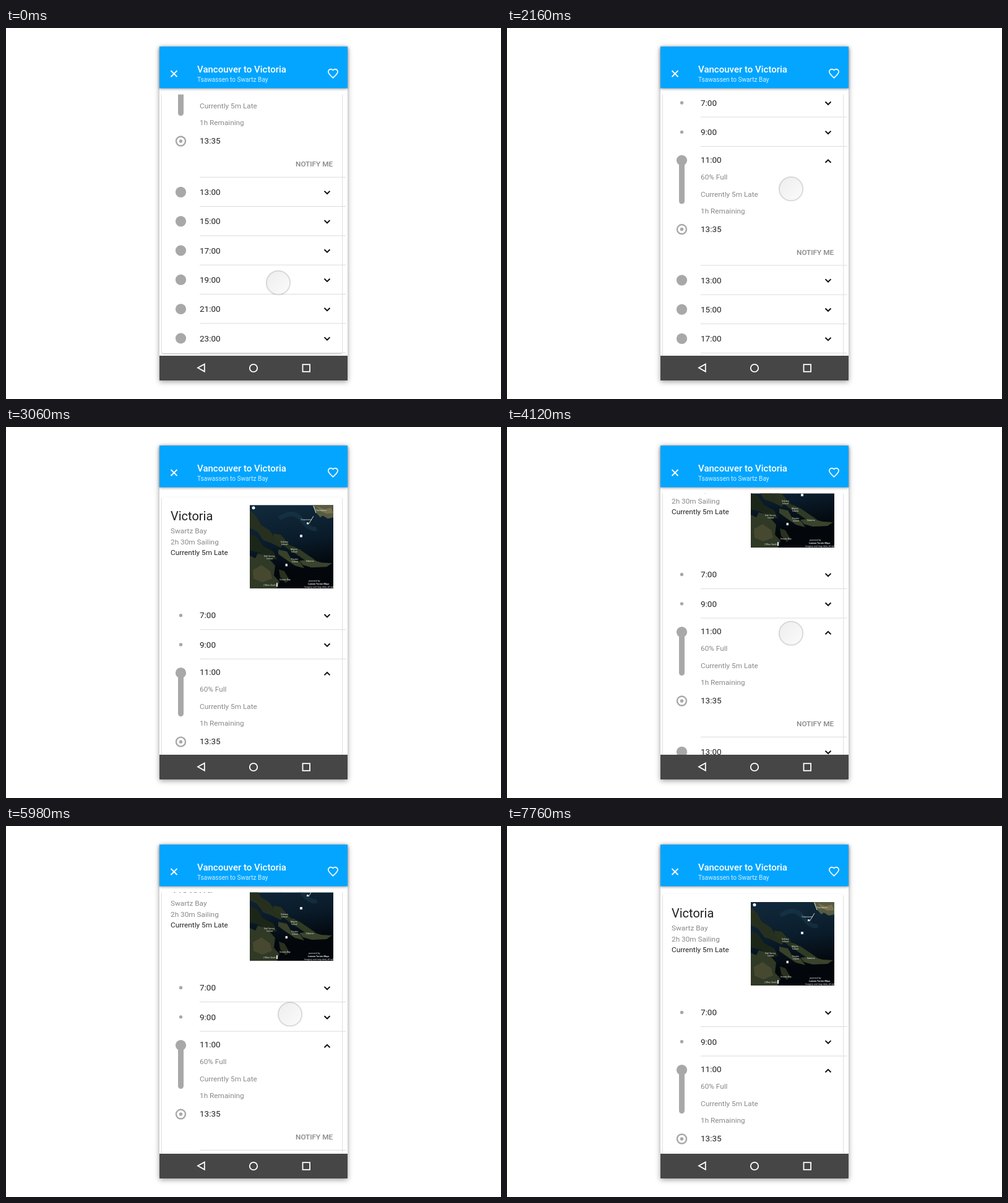
Recreate the animation shown at these times as an HTML page. Size 800x600 px, loop 7.78 s.

```html
<!DOCTYPE html>
<html lang="en">
<head>
<meta charset="utf-8">
<title>Ferry schedule</title>
<style>
  html, body { margin: 0; width: 100%; height: 100%; overflow: hidden; background: #fff; }
  svg { display: block; font: 11.8px Roboto, sans-serif; }
  .phone { fill: #fff; filter: drop-shadow(0 2px 4px rgba(0, 0, 0, .4)); }
  .header { fill: #03a5ff; filter: drop-shadow(0 1px 2px rgba(0, 0, 0, .4)); }
  .icon { fill: none; stroke: #fff; stroke-width: 1.8; }
  .card { fill: #fff; filter: drop-shadow(0 1px .8px rgba(0, 0, 0, .32)); }
  .time { font-size: 13.5px; fill: #222; }
  .note { fill: #888; }
  .rule { stroke: #dcdcdc; }
  .chevron { fill: none; stroke: #111; stroke-width: 2; }
  .mark { fill: #a8a8a8; }
  .ring { fill: none; stroke: #a8a8a8; stroke-width: 2.4; }
  .tiny { font-size: 3.6px; fill: #e4e8e4; }
</style>
</head>
<body>
<svg width="800" height="600" viewBox="0 0 800 600">
  <defs>
    <clipPath id="view"><rect x="248" y="107.5" width="304" height="422.5"/></clipPath>
    <clipPath id="mapEdge"><rect width="135" height="135"/></clipPath>
    <linearGradient id="sea" x1=".55" y1="0" x2=".7" y2="1">
      <stop offset="0" stop-color="#10283a"/>
      <stop offset=".4" stop-color="#0a1c2b"/>
      <stop offset=".75" stop-color="#03070c"/>
    </linearGradient>
    <linearGradient id="touch" x1="0" y1="0" x2="1" y2="1">
      <stop offset="0" stop-color="#e9e9e9"/>
      <stop offset="1" stop-color="#fafafa"/>
    </linearGradient>
  </defs>

  <rect class="phone" x="248" y="30" width="304" height="540"/>
  <g clip-path="url(#view)">
    <g id="list">
      <rect class="card" x="252" y="110" width="291" height="739" rx="2"/>
      <text x="266" y="148" font-size="20" fill="#222">Victoria</text>
      <text class="note" x="266" y="168.5">Swartz Bay</text>
      <text class="note" x="266" y="186.5">2h 30m Sailing</text>
      <text x="266" y="204" fill="#222">Currently 5m Late</text>
      <g id="map" transform="translate(394 123)" clip-path="url(#mapEdge)"></g>
      <g id="rows"></g>
    </g>
  </g>

  <rect class="header" x="248" y="30" width="304" height="67.5"/>
  <path class="icon" d="M266.5 69l10 10m0-10l-10 10"/>
  <text x="309" y="72" font-size="15" font-weight="500" fill="#fff">Vancouver to Victoria</text>
  <text x="309" y="87" font-size="10.1" fill="#d3efff">Tsawassen to Swartz Bay</text>
  <path class="icon" transform="translate(519.3 64.3) scale(.765)" style="stroke-width:2.1"
    d="M16.5 3c-1.74 0-3.41.81-4.5 2.09C10.91 3.81 9.24 3 7.5 3 4.42 3 2 5.42 2 8.5c0 3.78 3.4 6.86 8.55 11.54L12 21.35l1.45-1.32C18.6 15.36 22 12.28 22 8.5 22 5.42 19.58 3 16.5 3z"/>
  <rect x="248" y="530" width="304" height="40" fill="#464646"/>
  <path class="icon" d="M310 549.5L320.8 543.6V555.6z"/>
  <circle class="icon" cx="400" cy="550" r="6.2"/>
  <rect class="icon" x="479.5" y="544.2" width="11.6" height="11.6"/>
  <circle id="finger" r="19.2" fill="url(#touch)" fill-opacity=".8" stroke="#000" stroke-opacity=".13" stroke-width="2"/>
</svg>

<script>
const LOOP = 7780, PITCH = 47.3;
const $ = id => document.getElementById(id);

const text = (cls, y, s, x = 313) => `<text class="${cls}" x="${x}" y="${y}">${s}</text>`;
const dot = (y, r) => `<circle class="mark" cx="282.5" cy="${y}" r="${r}"/>`;
const rule = y => `<path class="rule" d="M313 ${y}H549.5"/>`;
const chevron = (y, h = 4.4) => `<path class="chevron" d="M514.5 ${y - h / 2}l4.5 ${h} 4.5 ${-h}"/>`;
const row = (y, time, r) => dot(y, r) + text('time', y + 4.8, time) + chevron(y + .5);

function buildRows() {
  let out = row(301.5, '7:00', 2.7) + rule(324.5) + row(348.8, '9:00', 2.7) + rule(372);
  out += dot(394.5, 8.6) + '<rect class="mark" x="278" y="390" width="9" height="75" rx="4.5"/>';
  out += text('time', 398.3, '11:00') + chevron(396, -4.4);
  out += text('note', 425, '60% Full') + text('note', 453, 'Currently 5m Late') + text('note', 480, '1h Remaining');
  out += '<circle class="ring" cx="282.5" cy="506" r="7.5"/>' + dot(506, 2.7) + text('time', 510.3, '13:35');
  out += '<text class="note" x="468" y="547.2" font-weight="500">NOTIFY ME</text>' + rule(564.3);
  for (let i = 0; i < 6; i++)
    out += row(588.3 + i * PITCH, `${13 + 2 * i}:00`, 8.6) + rule(564.3 + (i + 1) * PITCH);
  return out;
}

function buildMap() {
  const land = (fill, d) => `<path fill="${fill}" d="${d}"/>`;
  const label = (x, y, s) => text('tiny', y, s, x);
  return '<rect width="135" height="135" fill="url(#sea)"/>' +
    '<path d="M48 22q22-16 36 2t24 14" fill="none" stroke="#1b3c4d" stroke-width="7" opacity=".5"/>' +
    land('#27301f', 'M0 8l10 10 8 14 14 9 10 14 12 8-4 6-16-8-12-4-10-14-12-6z') +
    land('#1c2618', 'M0 46l12 6 9 14 17 9 6 12-10 2-18-12-16-4z') +
    land('#2f3925', 'M0 82l9 4 4-8 14 4 14 16-2 16 9 10-4 11H0z') +
    land('#46492f', 'M5 105l14-8 14 10 3 12-16 6-14-6z') +
    land('#28331f', 'M38 46l12 2 15 17 11 6 3 9-12-5-15-12-12-8z') +
    land('#384129', 'M46 72l14 3 7 12 14 5 7 10-15-4-16-11-11-8z') +
    land('#2f3b25', 'M68 66l13 6 22 15 9 7-5 3-18-8-19-13z') +
    land('#3a432c', 'M80 90l18-2 18 5 17 1-9 6-24 1-14-4z') +
    land('#28321f', 'M47 104l9 3 8 14-6 5-9-10z') +
    land('#565b41', 'M101 0h34v20l-9 2-8-5-4 3-8-9z') +
    land('#777052', 'M108 2l13 5 10-3 4 9-11 1-9-4z') +
    '<path d="M103 1l4 12M95 31l8-13" stroke="#d8d8ce" stroke-width="1"/>' +
    '<circle cx="6" cy="4.5" r="2.5" fill="#fff"/>' +
    '<path d="M81 48h4v4h-4zM57.5 95h3.5v4h-3.5zM92 28h3v3h-3zM43 126h2v6h-2z" fill="#dfe3e6"/>' +
    label(82, 25, 'Tsawassen') + label(107, 10, 'Vancouver') + label(50, 61, 'Galiano') + label(51, 65, 'Island') +
    label(66, 73, 'Mayne') + label(67, 77, 'Island') + label(23, 84, 'Salt Spring') + label(27, 88, 'Island') +
    label(67, 89, 'Pender') + label(68, 93, 'Island') + label(91, 92, 'Saturna') + label(48, 122, 'Swartz Bay') +
    label(22, 131, '(10km South)') + label(95, 124, 'powered by') +
    '<text class="tiny" x="94" y="129" font-weight="700">Lumora Terrain Maps</text>' + label(88, 133.5, 'Imagery and map data, all rights');
}

$('rows').innerHTML = buildRows();
$('map').innerHTML = buildMap();

const clamp = v => Math.max(0, Math.min(1, v));

// Each step: start, end, target value, ease-out power
function tween(t, value, steps) {
  for (const [start, end, to, power = 1] of steps) {
    if (t < start) break;
    const u = end > start ? clamp((t - start) / (end - start)) : 1;
    value += (to - value) * (1 - (1 - u) ** power);
  }
  return value;
}

const scroll = [
  [980, 1380, -394.2, 2], [1380, 1760, -323, 3],
  [2040, 2640, 70, 2], [2640, 3420, 0, 4],
  [4080, 4860, -324, 4],
  [5580, 6440, 11, 3], [6460, 7100, 0, 3]
];
const fingerY = [
  [900, 900, 300], [980, 1380, 156.6, 2],
  [2000, 2000, 200], [2040, 2620, 361, 2],
  [3800, 3800, 396], [4080, 4240, 256.5, 2],
  [5500, 5500, 200], [5580, 6440, 346, 2]
];
const fingerAlpha = [
  [160, 360, 0], [920, 1020, 1], [1400, 1560, 0],
  [2040, 2140, 1], [2680, 2880, 0],
  [3880, 4020, 1], [5140, 5280, 0],
  [5580, 5700, 1], [6480, 6640, 0]
];

function draw() {
  const t = performance.now() % LOOP;
  $('list').setAttribute('transform', `translate(0 ${tween(t, -323, scroll)})`);
  const finger = $('finger');
  finger.setAttribute('cx', t < 900 ? 440 : 459);
  finger.setAttribute('cy', tween(t, 412, fingerY));
  finger.setAttribute('opacity', tween(t, 1, fingerAlpha));
  requestAnimationFrame(draw);
}
draw();
</script>
</body>
</html>
```
